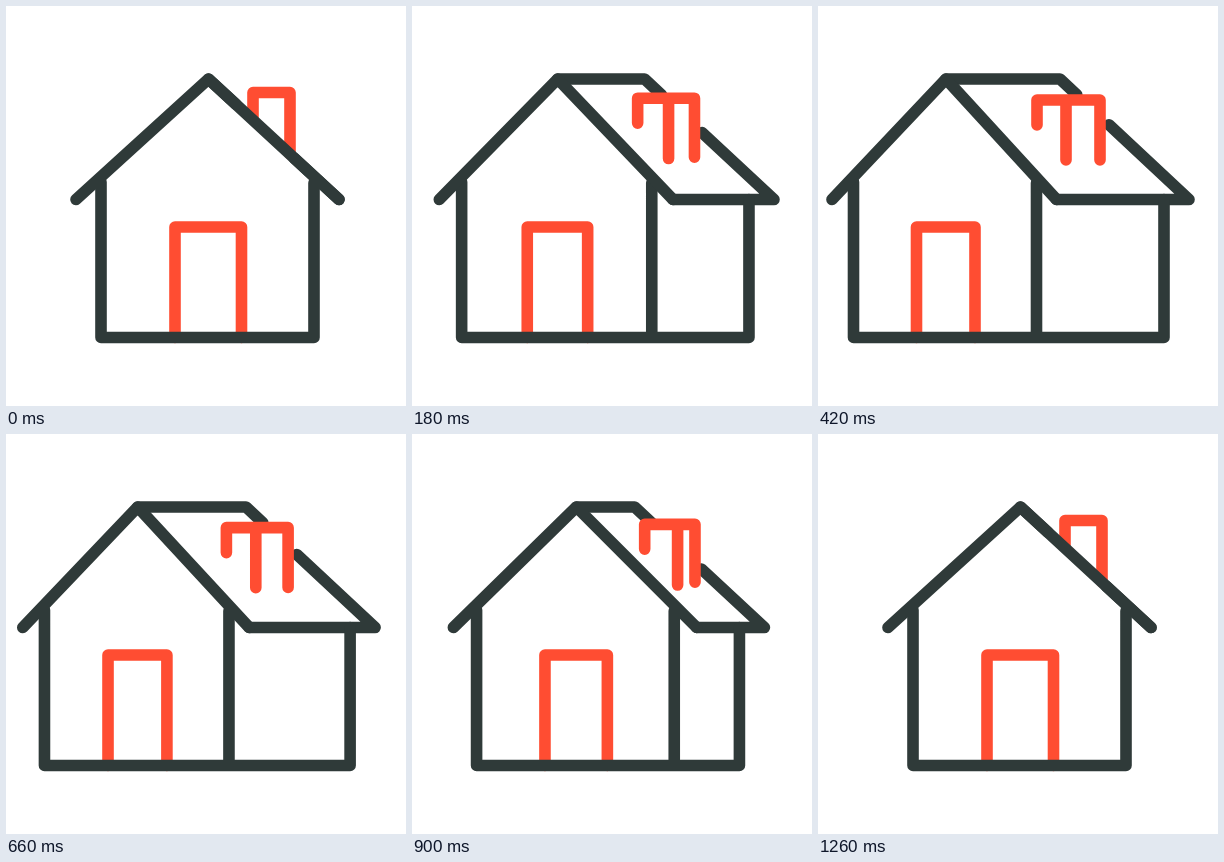
Animation of 400x400 px, one loop 1290 ms. Source, as an HTML page:

```html
<!DOCTYPE html>
<html>
<head>
<meta charset="utf-8">
<style>
html, body { margin: 0; width: 100%; height: 100%; overflow: hidden; background: #fff; }
svg { display: block; width: 100vw; height: 100vh; }
path { fill: none; stroke-width: 11.6; stroke-linecap: round; stroke-linejoin: round; }
.dark { stroke: #2f3a39; }
.red { stroke: #ff4d32; }
</style>
</head>
<body>
<svg viewBox="0 0 400 400">
  <path id="back" class="dark"/>
  <path id="chimney" class="red"/>
  <path id="door" class="red"/>
  <path id="walls" class="dark"/>
  <path id="front" class="dark"/>
</svg>
<script>
const LOOP = 1290, OPEN = 420, CLOSED = 1260;
const TOP = 73, EAVE = 193.5, BASE = 331.5;
const el = id => document.getElementById(id);
const mix = (a, b, t) => a + (b - a) * t;

// Cubic bezier easing with control points (x1, 0) and (x2, 1)
function ease(x1, x2) {
  return x => {
    if (x <= 0) return 0;
    if (x >= 1) return 1;
    let lo = 0, hi = 1, s;
    for (let i = 0; i < 24; i++) {
      s = (lo + hi) / 2;
      const v = 3 * s * (1 - s) ** 2 * x1 + 3 * s * s * (1 - s) * x2 + s ** 3;
      if (v < x) lo = s; else hi = s;
    }
    return s * s * (3 - 2 * s);
  };
}
const turnOut = ease(0.33, 0.1);
const turnBack = ease(0.89, 0.31);

function turnAt(ms) {
  return ms < OPEN ? turnOut(ms / OPEN) : 1 - turnBack((ms - OPEN) / (CLOSED - OPEN));
}

function draw(p) {
  const at = (a, b) => mix(a, b, p);
  const set = (id, d) => el(id).setAttribute('d', d);

  const apex = at(202.5, 128), ridge = at(202.5, 242);
  const eaveL = at(70, 14), eaveM = at(333, 238.5), eaveR = at(333, 371);
  const slope = k => `${mix(ridge, eaveR, k)} ${mix(TOP, EAVE, k)}`;
  // The rear slope is interrupted behind the chimney
  const gapStart = 0.13 + 0.08 * Math.max(0, 1 - 2.5 * p);
  const gapEnd = at(0.655, 0.38);
  set('back', `M${apex} ${TOP}H${ridge}L${slope(gapStart)}M${slope(gapEnd)}L${eaveR} ${EAVE}H${eaveM}`);

  const top = at(86.5, 94);
  set('chimney', `M${at(247, 219)} ${at(111, 119)}V${top}H${at(284, 282)}V${at(142, 154)}` +
    `M${at(284, 248)} ${top}V${at(148, 154)}`);

  set('door', `M${at(169, 98.5)} ${BASE}V221H${at(235.5, 157)}V${BASE}`);

  set('walls', `M${at(95, 35.5)} 176V${BASE}H${at(308, 346)}V${EAVE}` +
    `M${at(308, 218.5)} 177V${BASE}`);

  set('front', `M${eaveL} ${EAVE}L${apex} ${TOP}L${eaveM} ${EAVE}`);
}

const start = performance.now();
function tick() {
  draw(turnAt((performance.now() - start) % LOOP));
  requestAnimationFrame(tick);
}
tick();
</script>
</body>
</html>
```
